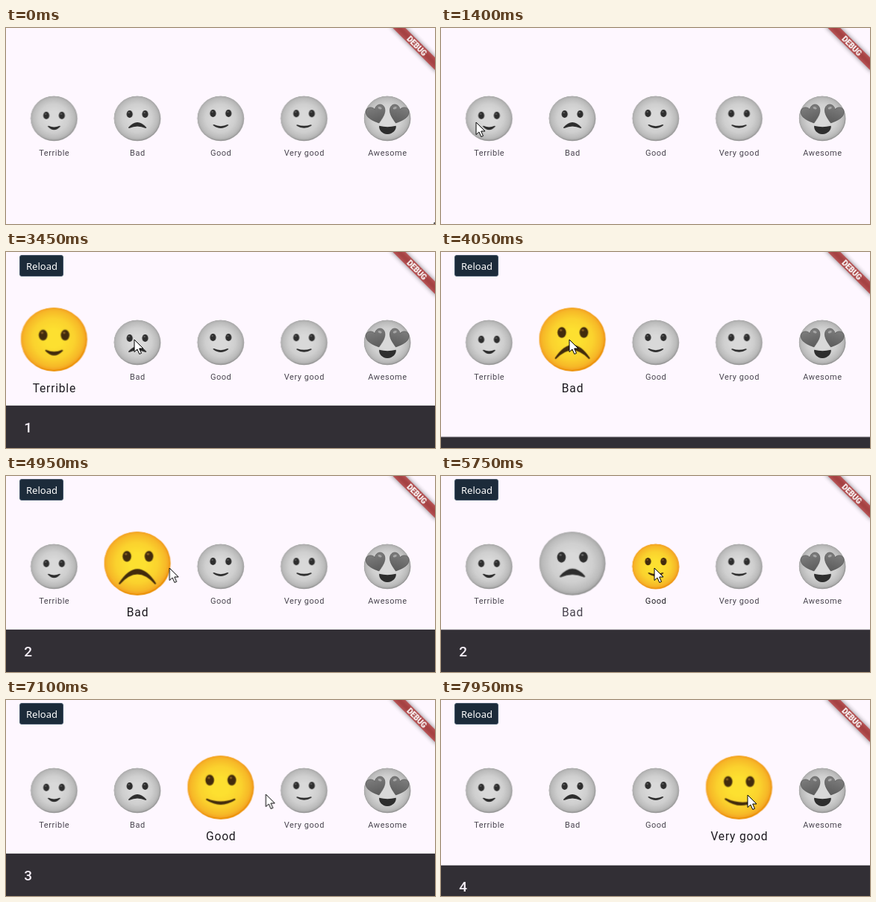
These frames come from a looping animation (575 by 264 pixels, 8 s). An HTML page:

```html
<!DOCTYPE html>
<html lang="en">
<head>
<meta charset="utf-8">
<title>Mood rating</title>
<style>
  html, body { margin: 0; width: 100%; height: 100%; overflow: hidden; background: #fef7ff; }
  svg { display: block; width: 575px; height: 264px; }
  text { font-family: Roboto, sans-serif; }
  .label { font-size: 11px; letter-spacing: .55px; text-anchor: middle; fill: #49454f; }
  .gray { filter: grayscale(1); }
  .ink { fill: #422b0d; }
  .mouth { stroke: #422b0d; stroke-width: 1.5; stroke-linejoin: round; }
  .crease { fill: none; stroke: #422b0d; stroke-width: 3.2; stroke-linejoin: round; }
  .digit { font-size: 19px; font-weight: 500; fill: #f5eff7; }
  .debug { font-size: 10.2px; font-weight: 900; text-anchor: middle; fill: #fff; }
  .tip text { font: 13px "Noto Sans", "Open Sans", sans-serif; fill: #fff; }
</style>
</head>
<body>
<svg viewBox="0 0 575 264">
  <defs>
    <radialGradient id="skin">
      <stop offset=".3" stop-color="#fde030"/>
      <stop offset=".65" stop-color="#fbd22e"/>
      <stop offset=".9" stop-color="#f7b928"/>
      <stop offset="1" stop-color="#f4a223"/>
    </radialGradient>
    <linearGradient id="heart" x2="0" y2="1">
      <stop offset="0" stop-color="#f75c50"/>
      <stop offset="1" stop-color="#e8372b"/>
    </linearGradient>
    <filter id="soft" x="-20%" y="-80%" width="140%" height="260%"><feGaussianBlur stdDeviation="3"/></filter>
  </defs>

  <g id="faces"></g>

  <g id="bar">
    <rect y="206.5" width="575" height="1" fill="#322f35" opacity=".35"/>
    <rect y="207" width="575" height="58" fill="#322f35"/>
  </g>

  <g class="tip" id="tip">
    <rect x="18.5" y="4.5" width="58" height="28" rx="2.5" fill="#1c2b3a" stroke="#46586b"/>
    <text x="27" y="24">Reload</text>
  </g>

  <g transform="translate(575) rotate(45)">
    <rect x="-44" y="28" width="88" height="12" opacity=".5" filter="url(#soft)"/>
    <rect x="-44" y="28" width="88" height="12" fill="#b71c1c" fill-opacity=".63"/>
    <text class="debug" y="37.6">DEBUG</text>
  </g>

  <path id="cursor" d="M0 0V16.6L3.9 13L6.8 19.5L9.5 18.3L6.7 12H12Z" fill="#fff" stroke="#000" stroke-linejoin="round"/>
</svg>

<script>
const LOOP = 8000;
const style = document.head.appendChild(document.createElement('style'));
let count = 0;

// keys: [ms, declarations, easing]
function animate(el, keys, easing = 'linear') {
  const name = 'k' + count++;
  const all = [...keys];
  if (all[0][0] > 0) all.unshift([0, all[0][1]]);
  const last = all[all.length - 1];
  if (last[0] < LOOP) all.push([LOOP, last[1]]);
  const body = all.map(([ms, css, ease]) =>
    `${(ms / LOOP * 100).toFixed(4)}%{${css}${ease ? ';animation-timing-function:' + ease : ''}}`).join('');
  style.textContent += `@keyframes ${name}{${body}}`;
  el.style.animation = `${name} ${LOOP}ms ${easing} infinite`;
}

function add(parent, tag, attrs = {}, text = '') {
  const el = document.createElementNS('http://www.w3.org/2000/svg', tag);
  for (const k in attrs) el.setAttribute(k, attrs[k]);
  el.textContent = text;
  return parent.appendChild(el);
}

const $ = id => document.getElementById(id);
const move = (x, y) => `transform:translate(${x}px,${y}px)`;
const show = on => `opacity:${on ? 1 : 0}`;
const EASE = 'cubic-bezier(.4,0,.2,1)';
const BACK = 'cubic-bezier(.8,0,.6,1)';
const PICKS = [1435, 3735, 5735, 7585, LOOP];

// mouth: half width, corner height, upper and lower sag, tilt
const pose = (eye, w, y, a, b, tilt = 0, eyeX = 0) => ({
  eyes: move(eyeX, eye),
  mouth: `M${-w} ${y - tilt}Q0 ${y + 2 * a} ${w} ${y + tilt}Q0 ${y + 2 * b} ${-w} ${y - tilt}Z`
});

const terrible = pose(-4.2, 7.6, 10.5, 1.7, 4);
const bad = pose(-6, 11.3, 12.3, -6.6, -2.6);
const sad = pose(-6.8, 16.8, 19, -13, -9.5, 0, .5);
const good = pose(-7, 9.5, 8.7, 2.2, 3.6);
const fine = pose(-6.8, 9.3, 9, 1.6, 3);

// each pose is timed from the moment the face is picked
const moods = [
  { label: 'Terrible', poses: [[0, terrible]], wince: [200, 1400] },
  { label: 'Bad', poses: [[0, bad], [450, sad], [900, pose(-6.2, 16.3, 18.4, -12.4, -9)], [1215, sad], [1600, sad]] },
  { label: 'Good', poses: [[0, good], [365, pose(-5.6, 13.1, 12.2, 2.8, 4.3, .4)],
                           [1000, pose(-6.4, 13.2, 11.8, 2.7, 4.2, -.3)], [1365, pose(-7, 13.1, 11.3, 2.7, 4.2)]] },
  { label: 'Very good', poses: [[0, fine], [365, pose(-5.6, 12.8, 12.2, 2.4, 4, 1.3)]] },
  { label: 'Awesome' }
];

function drawHearts(face) {
  for (const side of [-1, 1]) {
    const eye = add(face, 'g', { transform: `translate(${side * 15} -6.5) rotate(${side * 17}) scale(${side} 1)` });
    add(eye, 'path', {
      d: 'M0 13C-8 7-13 2-13-4C-13-12-3-13 0-6C3-13 13-12 13-4C13 2 8 7 0 13Z',
      fill: 'url(#heart)', stroke: '#c9302a', 'stroke-width': .6
    });
    add(eye, 'ellipse', { cx: -7, cy: -6, rx: 2.6, ry: 1.5, fill: '#ff8f85', transform: 'rotate(-35 -7 -6)' });
  }
  add(face, 'path', { class: 'ink', d: 'M-11 9.8Q0 12.5 11.5 9.8C12.6 15.5 6 21.5 0 21C-6 21.5-12 15.5-11 9.8Z' });
}

function drawWince(face) {
  const g = add(face, 'g', { class: 'crease' });
  for (const s of [-1, 1])
    add(g, 'path', { d: `M${s * 19} -3.8Q${s * 13} -1.5 ${s * 8.5} 2.4Q${s * 14} 4.5 ${s * 18} 8.8M${s * 8.5} 2.4H${s * 18}` .replace(/M[^M]*H.*$/, '') });
  let d = 'M-15 20.3';
  for (let i = 1; i < 7; i++) d += `L${-15 + i * 5} ${i === 6 ? 20.3 : i % 2 ? 14.8 : 19}`;
  add(g, 'path', { d });
  return g;
}

function drawFace(mood, i) {
  const column = add($('faces'), 'g', { transform: `translate(${64.4 + i * 111.7} 132)` });
  const body = add(column, 'g');
  const face = add(add(body, 'g', { transform: 'translate(0 -10)' }), 'g', { class: 'gray' });
  add(face, 'ellipse', { rx: 31.3, ry: 30.2, fill: '#eb8f00' });
  add(face, 'ellipse', { cx: -.5, cy: -.7, rx: 30.8, ry: 29.5, fill: 'url(#skin)' });
  const label = add(body, 'text', { class: 'label', x: .3, y: 40 }, mood.label);
  if (!mood.poses) return drawHearts(face);

  const plain = add(face, 'g');
  const eyes = add(plain, 'g');
  for (const x of [-10.4, 10.4]) {
    add(eyes, 'ellipse', { class: 'ink', cx: x, rx: 4.1, ry: 5.1 });
    add(eyes, 'ellipse', { cx: x - .9, cy: -2.1, rx: 1.2, ry: 1, fill: '#896024' });
  }
  const mouth = add(plain, 'path', { class: 'ink mouth', d: mood.poses[0][1].mouth });

  const start = PICKS[i], end = PICKS[i + 1], ends = end < LOOP;
  const small = 'transform:scale(1)', big = 'transform:scale(1.42)';
  const size = [[0, small], [start, small, EASE], [start + 250, big], [end, big, EASE]];
  if (ends) size.push([end + 250, small]);
  animate(body, size);

  const tint = [[0, 'filter:grayscale(1)'], [start, 'filter:grayscale(0)']];
  const ink = [[0, 'fill:#49454f'], [start, 'fill:#1d1b20']];
  if (ends) {
    tint.push([end, 'filter:grayscale(1)']);
    ink.push([end, 'fill:#49454f']);
  }
  animate(face, tint, 'step-end');
  animate(label, ink, 'step-end');

  const keys = mood.poses.map(([ms, p]) => [start + ms, p]);
  if (ends) keys.push([end - 1, keys[keys.length - 1][1]], [end, keys[0][1]]);
  animate(eyes, keys.map(([ms, p]) => [ms, p.eyes, 'ease-in-out']));
  animate(mouth, keys.map(([ms, p]) => [ms, `d:path("${p.mouth}")`, 'ease-in-out']));

  if (mood.wince) {
    const [on, off] = mood.wince.map(ms => start + ms);
    animate(plain, [[0, show(1)], [on, show(0)], [off, show(1)]], 'step-end');
    const wince = drawWince(face);
    animate(wince, [[0, show(0)], [on, show(1)], [off, show(0)]], 'step-end');
  }
}

moods.forEach(drawFace);

// bottom bar: slides down, swaps its number, slides up again
const up = move(0, 0), down = move(0, 58);
const slide = [[0, down], [PICKS[0], down, EASE], [PICKS[0] + 250, up]];
for (const t of PICKS.slice(1, 4)) {
  slide.push([t, up, BACK], [t + 250, down, EASE]);
  if (t + 500 < LOOP) slide.push([t + 500, up]);
}
slide[slide.length - 1].pop();
slide.push([7890, move(0, 43)], [7950, move(0, 16)], [LOOP, move(0, 7)]);
animate($('bar'), slide);

[0, PICKS[1] + 250, PICKS[2] + 250, PICKS[3] + 250, LOOP].forEach((from, i, times) => {
  if (from === LOOP) return;
  const digit = add($('bar'), 'text', { class: 'digit', x: 24.3, y: 242.5 }, i + 1);
  const keys = from ? [[0, show(0)], [from, show(1)]] : [[0, show(1)]];
  if (times[i + 1] < LOOP) keys.push([times[i + 1], show(0)]);
  animate(digit, keys, 'step-end');
});

animate($('tip'), [[0, show(0)], [2700, show(1)]], 'step-end');

animate($('cursor'), [
  [0, 574, 262], [200, 574, 262], [250, 553, 256], [300, 525, 249], [350, 497, 246], [400, 470, 254],
  [445, 450, 275], [600, 165, 275], [650, 148, 222, 'ease-out'], [1050, 47, 127], [1400, 47, 127],
  [1550, 54, 126], [2500, 54, 126], [3050, 141, 121], [3450, 172, 118], [4600, 172, 118],
  [4950, 219, 124], [5350, 278, 124], [5520, 278, 124], [5700, 286, 124], [6700, 286, 124],
  [7100, 348, 127], [7200, 377, 128], [7350, 393, 128], [7570, 393, 128], [7700, 411, 128]
].map(([ms, x, y, ease]) => [ms, move(x, y), ease]));
</script>
</body>
</html>
```
